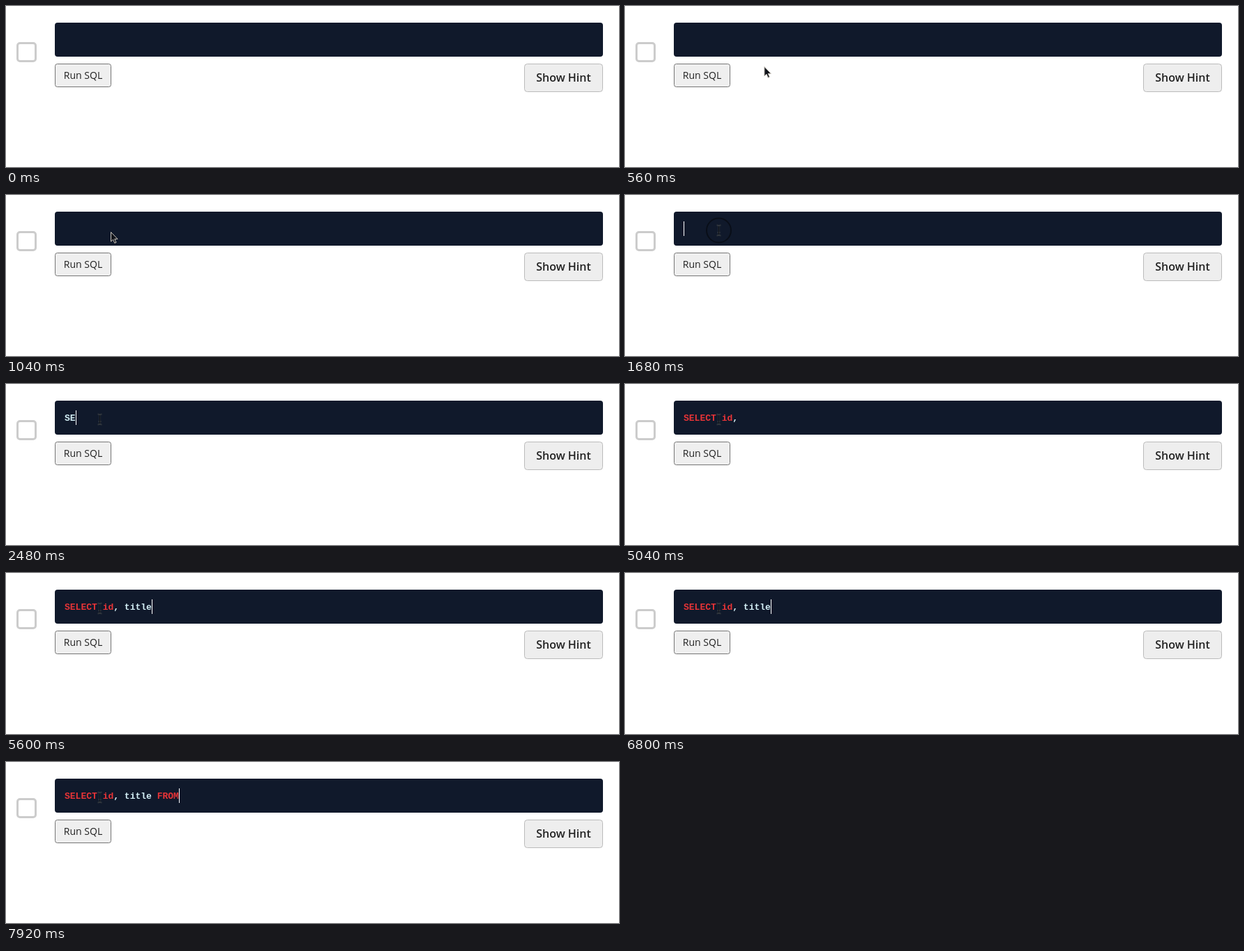
Recreate the animation shown at these times as an HTML page. Size 879 px wide and 232 px high, loop 8 s.

```html
<!DOCTYPE html>
<html lang="en">
<head>
<meta charset="utf-8">
<title>SQL editor</title>
<style>
  html, body { margin: 0; width: 100%; height: 100%; overflow: hidden; background: #fff; }
  svg { display: block; }
  text { font-family: "Open Sans", "Noto Sans", sans-serif; fill: #222; text-anchor: middle; }
  #query { font: bold 13px "Liberation Mono", monospace; fill: #d5f0f7; text-anchor: start; white-space: pre; }
  .keyword { fill: #e93437; }
</style>
</head>
<body>
<svg width="879" height="232" viewBox="0 0 879 232">
  <rect x="16.5" y="53.5" width="26" height="26" rx="3.5" fill="#fff" stroke="#ccc" stroke-width="3"/>
  <rect x="70" y="24" width="786" height="49" rx="4" fill="#10192b"/>
  <rect x="70.5" y="83.5" width="80" height="33" rx="3" fill="#efefef" stroke="#767676"/>
  <text x="110.5" y="105" font-size="14">Run SQL</text>
  <rect x="743.5" y="83.5" width="112" height="40" rx="4" fill="#eee" stroke="#bbb"/>
  <text x="799.5" y="109" font-size="16" font-weight="600">Show Hint</text>
  <text id="query" x="84" y="53"></text>
  <rect id="caret" y="38" width="1" height="21" fill="#fff"/>
  <g id="pointer">
    <circle id="ring" r="17.5" fill="none" stroke="#000" stroke-opacity=".45" stroke-width="2"/>
    <path id="arrow" d="M.5 .5V14L3.6 11.2 5.8 16.3 8 15.3 5.8 10.4H10Z" fill="#10131a" stroke="#cbc6bd"/>
    <g id="beam" fill="none">
      <path d="M-3-7.5Q0-7.5 0-5.5Q0-7.5 3-7.5M0-6V6M-2 3H2M-3 7.5Q0 7.5 0 5.5Q0 7.5 3 7.5" stroke="#30363d" stroke-width="2"/>
      <path d="M0-6V6" stroke="#0b0e14"/>
    </g>
  </g>
</svg>
<script>
const LOOP = 8000, STEP = 80, CHAR = 7.8, BLINK = 520;
const ENTER = 240, ARRIVE = 880, SETTLE = 1040, HOVER = 1440, CLICK = 1640;

// Bursts of typing: text, start and pause between keys; "<" is backspace
const bursts = [
  ["SELE", 2320, 160], ["CT ", 3120, 120], ["id, ", 4160, 106],
  ["title", 5180, 100], [" <", 6230, 570], [" FROM", 7510, 100]
];

const edits = [{ time: CLICK, text: "" }];
for (const [keys, start, pause] of bursts)
  [...keys].forEach((key, i) => {
    const { text } = edits.at(-1);
    edits.push({ time: start + i * pause, text: key === "<" ? text.slice(0, -1) : text + key });
  });

const $ = id => document.getElementById(id);
const show = (id, on) => $(id).setAttribute("visibility", on ? "visible" : "hidden");
const between = (t, from, to) => t >= from && t < to;

function pointerAt(t) {
  if (t >= HOVER) return t < HOVER + STEP ? [141, 55] : [134.5, 51];
  if (t >= SETTLE) return [150, 53];
  const progress = (t - ENTER) / (ARRIVE - ENTER);
  const left = (1 - Math.min(1, Math.max(0, progress))) ** 2;
  return [154.5 + 179.5 * left, 61 + 104 * left];
}

function draw(t) {
  const { time, text } = edits.findLast(edit => edit.time <= t) || edits[0];
  $("query").innerHTML = text.replace(/\b(SELECT|id|FROM)\b/g, '<tspan class="keyword">$1</tspan>');
  $("caret").setAttribute("x", Math.round(84 + text.length * CHAR));
  show("caret", t >= CLICK && (t - time) % (2 * BLINK) < BLINK);

  $("pointer").setAttribute("transform", `translate(${pointerAt(t)})`);
  show("arrow", between(t, ENTER, HOVER));
  show("beam", t >= HOVER);
  show("ring", between(t, ARRIVE, SETTLE) || between(t, CLICK, CLICK + 120));
}

const origin = performance.now();
function tick() {
  const t = (performance.now() - origin) % LOOP;
  draw(Math.floor(t / STEP) * STEP);
  requestAnimationFrame(tick);
}
tick();
</script>
</body>
</html>
```
